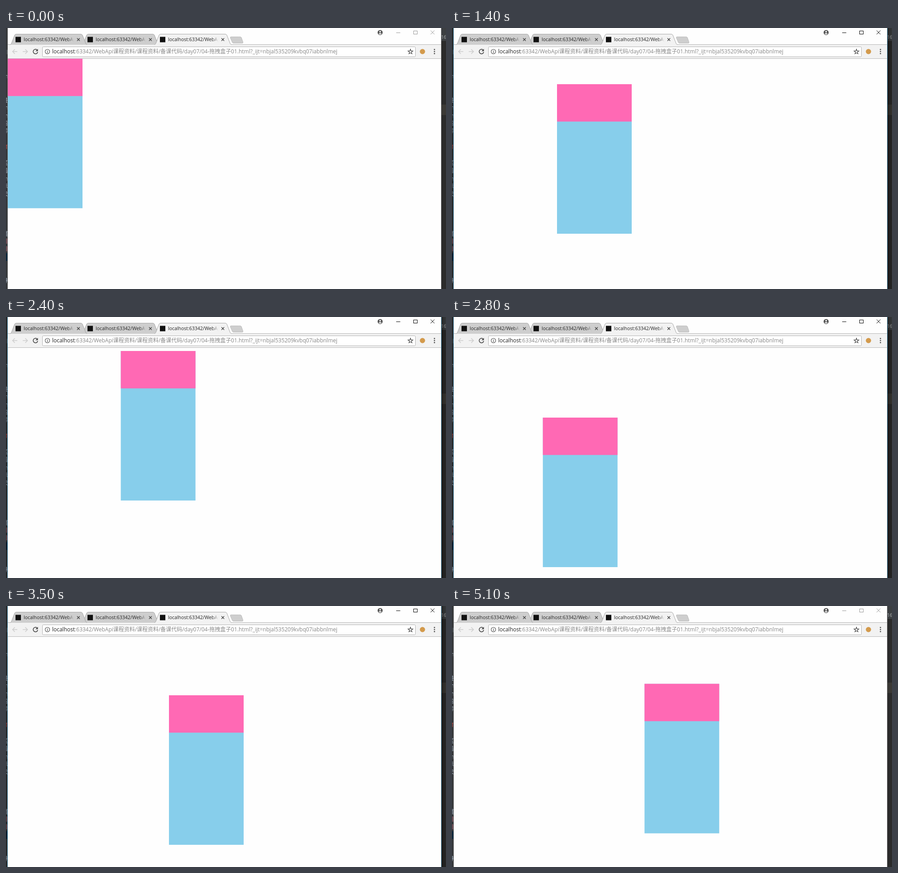
These frames come from a looping animation (972x576 px, 5300 ms). An HTML page:

```html
<!DOCTYPE html>
<html lang="zh">
<head>
<meta charset="utf-8">
<title>Drag box</title>
<style>
html, body { margin: 0; width: 100%; height: 100%; overflow: hidden; background: #2b2b2b; }
svg { display: block; width: 972px; height: 576px; }
text { font-family: "Open Sans", "Noto Sans", "Noto Sans CJK SC", "Noto Sans CJK", sans-serif; white-space: pre; }
</style>
</head>
<body>
<svg viewBox="0 0 972 576" width="972" height="576">
  <defs>
    <linearGradient id="fade" gradientUnits="userSpaceOnUse" x1="97" x2="111" y1="0" y2="0">
      <stop offset="0" stop-color="#222"/>
      <stop offset="1" stop-color="#222" stop-opacity="0"/>
    </linearGradient>
    <linearGradient id="shade">
      <stop offset="0" stop-opacity=".4"/>
      <stop offset="1" stop-opacity=".12"/>
    </linearGradient>
    <clipPath id="edge"><rect width="4" height="576"/></clipPath>
  </defs>

  <!-- editor behind the window -->
  <rect width="972" height="576" fill="#2b2b2b"/>
  <rect width="4" height="576" fill="#36393b"/>
  <rect y="497" width="4" height="17" fill="#0d293e"/>
  <rect x="961" width="11" height="30" fill="#3c3f41"/>
  <rect x="961" y="29" width="11" height="1" fill="#242424"/>
  <rect x="961" y="169" width="11" height="23" fill="#3b3935"/>
  <text x="961" y="24" font-size="10.5" fill="#b0b4b8">16</text>
  <g id="scraps" clip-path="url(#edge)" font-size="12" text-anchor="end"></g>
  <g id="shadow">
    <rect width="4" height="576" opacity=".22"/>
    <rect x="961" width="11" height="576" fill="url(#shade)"/>
  </g>

  <!-- browser window -->
  <path id="frame" d="M3.500 0V576M961.500 0V576"/>
  <rect x="4" width="957" height="576" fill="#fefefe"/>
  <rect x="4" y="37" width="957" height="30" fill="#f2f2f2"/>
  <path d="M4 36.500H961" stroke="#b4b4b4"/>
  <path d="M4 67.500H961" stroke="#b8b8b8"/>
  <path d="M497 19.500H517Q519 19.500 520 21L523.500 31Q524 33.500 522 33.500H503Q501 33.500 500 32L495.500 21.500Q495 19.500 497 19.500Z" fill="#cecece" stroke="#bdbdbd"/>
  <g id="tabs"></g>

  <!-- title bar -->
  <circle cx="826.500" cy="10" r="5.600" fill="#555"/>
  <circle cx="826.500" cy="8.300" r="1.800" fill="#fff"/>
  <path d="M823 13Q826.500 9.500 830 13Q826.500 15.500 823 13Z" fill="#fff"/>
  <g id="controls" fill="none" stroke-width="1">
    <path d="M862 10.500H871"/>
    <rect x="900.500" y="6.500" width="8" height="7"/>
    <path d="M938 5.500L946.500 14M946.500 5.500L938 14"/>
  </g>

  <!-- toolbar -->
  <g fill="none" stroke="#cdcdcd" stroke-width="1.500">
    <path d="M25 52H14.500M19.500 47L14.500 52L19.500 57"/>
    <path d="M37 52H47.500M42.500 47L47.500 52L42.500 57"/>
    <path d="M68.700 48.500A5 5 0 1 0 70 53" stroke="#484848" stroke-width="1.700"/>
  </g>
  <path d="M70.500 46V51.300H65.200Z" fill="#484848"/>
  <rect x="80.500" y="41.500" width="824" height="22" rx="2" fill="#fff" stroke="#b2b2b2"/>
  <circle cx="91.500" cy="52" r="5" fill="none" stroke="#555" stroke-width="1.200"/>
  <path d="M91.500 51V55M91.500 48.700V50" stroke="#555" stroke-width="1.300"/>
  <text x="102" y="56" font-size="11.970" fill="#888"><tspan fill="#222">localhost</tspan>:63342/WebApi课程资料/课程资料/备课代码/day07/04-拖拽盒子01.html?_ijt=nbjal535209kvbq07iabbnlmej</text>
  <path id="star" fill="none" stroke="#505050" stroke-width="1.300"/>
  <circle cx="920" cy="52" r="5.800" fill="#d39a4c"/>
  <rect id="hover" x="937" y="42" width="19" height="20" rx="2" fill="#d9d9d9"/>
  <g fill="#505050">
    <circle cx="946.500" cy="47.500" r="1.400"/>
    <circle cx="946.500" cy="52" r="1.400"/>
    <circle cx="946.500" cy="56.500" r="1.400"/>
  </g>

  <!-- dragged box -->
  <g id="box">
    <rect width="165" height="330" fill="#87ceeb"/>
    <rect width="165" height="82.500" fill="#ff69b4"/>
  </g>
</svg>
<script>
const $ = id => document.getElementById(id);
const LOOP = 5300, STEP = 100;

// each drag: start time, then one position per step
const drags = [
  [0, [4, 67.7]],
  [1100, [4.8, 67.7], [96, 97], [142, 112], [232, 124], [362, 148], [462, 157], [491.3, 162.6]],
  [2200, [462, 156], [365, 123], [253.6, 75], [152, 88], [90, 140], [116, 197],
         [200.7, 222], [290, 213], [400, 190], [447, 147], [410, 112], [350, 125],
         [320, 167], [360, 197], [405, 185], [425.3, 171.7]]
];

function boxAt(t) {
  const [start, ...path] = drags.filter(d => d[0] <= t).pop();
  return path[Math.min(path.length - 1, Math.floor((t - start) / STEP))];
}

function tab(x, fill) {
  return `<g transform="translate(${x})">
    <path d="M-30 37Q-28 36 -27 34L-20 16Q-19 13.500 -16.500 13.500H126Q129 13.500 130 16L137 34Q138 36 140 37" fill="${fill}" stroke="#a6a6a6"/>
    <rect x="-18" y="19.500" width="12" height="12" fill="#111"/>
    <text y="29" font-size="10.500" fill="url(#fade)">localhost:63342/WebAp</text>
    <path d="M118 22.500L124 28.500M124 22.500L118 28.500" stroke="#444" stroke-width="1.400"/>
  </g>`;
}
// left neighbours overlap the right ones; the active tab lies on top
$('tabs').innerHTML = tab(198, '#cecece') + tab(39, '#cecece') + tab(358, '#f2f2f2');

const scraps = [['l', 58], ['n', 111], ['娃', 164], ['h', 180], ['h', 198], ['绍', 215],
  ['即', 232], ['T', 267, '#c75450'], ['区', 302], ['监', 319], ['m', 337], ['示', 354],
  ['犬', 371], ['属', 459], ['目', 475, '#b06a78'], ['目', 492, '#b06a78'], ['神', 562]];
$('scraps').innerHTML = scraps.map(([c, y, fill = '#a9b7c6']) =>
  `<text x="4.500" y="${y}" fill="${fill}">${c}</text>`).join('');

$('star').setAttribute('d', 'M' + Array.from({ length: 10 }, (_, i) => {
  const r = i % 2 ? 2.4 : 5.6, a = (i / 5 - 0.5) * Math.PI;
  return (893.5 + r * Math.cos(a)).toFixed(1) + ' ' + (52.4 + r * Math.sin(a)).toFixed(1);
}).join('L') + 'Z');

function draw(t) {
  const active = t >= 1100 && t < 5100;
  $('box').setAttribute('transform', `translate(${boxAt(t)})`);
  $('controls').setAttribute('stroke', active ? '#000' : '#999');
  $('frame').setAttribute('stroke', active ? '#5b9fc4' : '#6e7072');
  $('shadow').setAttribute('visibility', active ? 'visible' : 'hidden');
  $('hover').setAttribute('visibility', t >= 4500 && t < 5100 ? 'visible' : 'hidden');
}

function tick() {
  draw(performance.now() % LOOP);
  requestAnimationFrame(tick);
}
tick();
</script>
</body>
</html>
```
